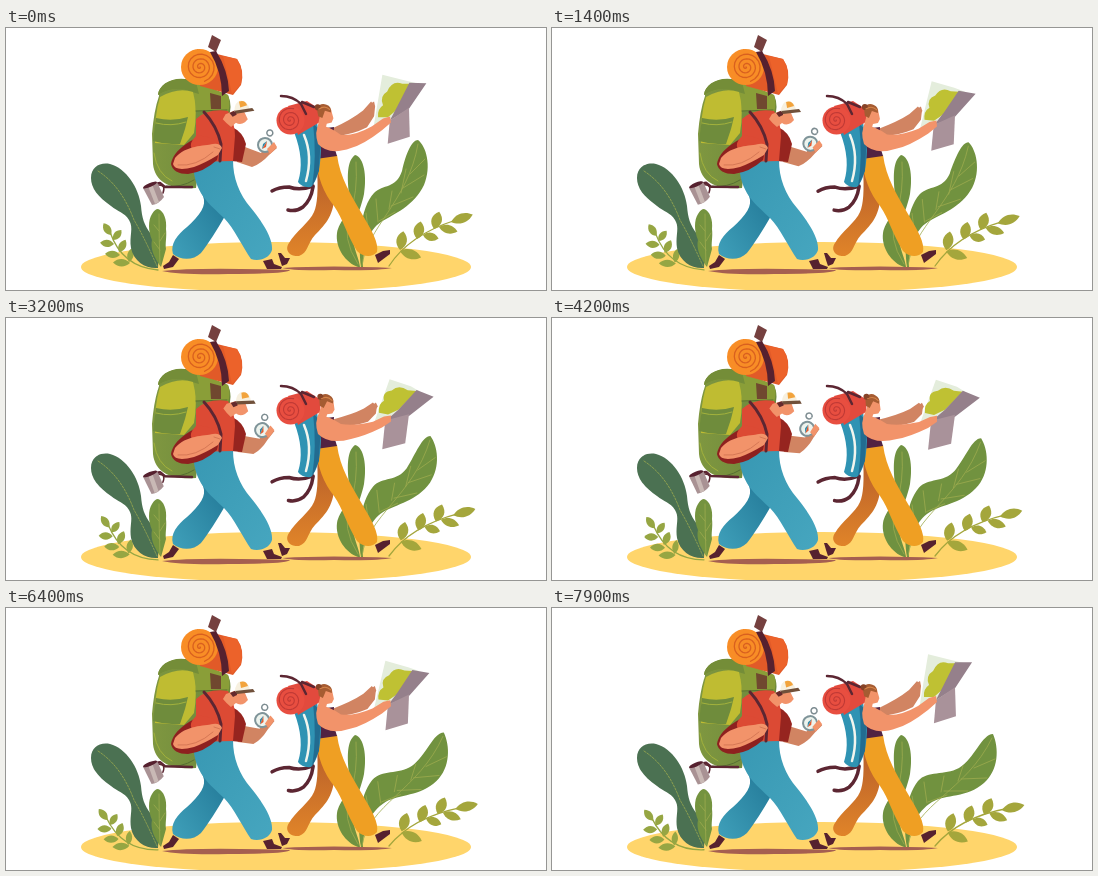
An HTML page for the animation above (8000 ms loop, 540 by 262 pixels).

```html
<!DOCTYPE html>
<html lang="en">
<head>
<meta charset="utf-8">
<title>Hikers</title>
<style>
html, body { margin: 0; width: 100%; height: 100%; overflow: hidden; background: #fff; }
svg { display: block; width: 100vw; height: 100vh; }
.line { fill: none; stroke-linecap: round; stroke-linejoin: round; }
.dark { fill: #56212f; }
.strap { stroke: #5c2632; }
.vein { stroke: #9dab4e; stroke-width: .8; }
.skin { fill: #f2936a; }
.tan { fill: #d18462; }
</style>
</head>
<body>
<svg viewBox="0 0 540 262">
  <defs>
    <linearGradient id="teal" x1="0" y1="0" x2="1" y2="1">
      <stop offset="0" stop-color="#3898b3"/><stop offset="1" stop-color="#46a6bf"/>
    </linearGradient>
    <linearGradient id="deepTeal" x1="1" y1="0" x2="0" y2="1">
      <stop offset="0" stop-color="#207594"/><stop offset="1" stop-color="#3fa0ba"/>
    </linearGradient>
    <linearGradient id="pack" x1="0" x2="1">
      <stop offset="0" stop-color="#7f9740"/><stop offset="1" stop-color="#6b863b"/>
    </linearGradient>
    <linearGradient id="rust" x1="0" y1="0" x2="0" y2="1">
      <stop offset="0" stop-color="#b85f2a"/><stop offset="1" stop-color="#e08429"/>
    </linearGradient>
  </defs>

  <ellipse cx="270" cy="239" rx="195" ry="25" fill="#ffd56b"/>

  <!-- left plants -->
  <g id="sprigL"></g>
  <path fill="#4b7152" d="M85 150C85 139 94 134 104 136C120 140 133 160 135 178C136 190 138 197 145 206C152 214 153 228 152 240C140 241 128 234 125 220C123 208 128 200 123 192C118 184 112 184 105 178C92 169 85 160 85 150Z"/>
  <path class="line vein" stroke-dasharray="2 1.500" d="M92 143C112 156 122 176 128 192Q137 207 151 238"/>
  <path fill="#74933f" d="M152 181C158 183 161 192 160 201C161 209 159 215 160 221L155 239C148 230 144 220 146 212C142 203 142 192 146 186Q149 181 152 181Z"/>
  <path class="line vein" d="M153 186Q153 210 154 237M153 203L148 197M154 213L159 205M154 222L148 214"/>

  <!-- right plants -->
  <path fill="#6f9140" d="M352 239C340 235 329 220 331 205C333 193 345 185 343 166C341 148 341 133 349 127C358 129 361 148 358 166C354 186 345 196 347 212C349 224 353 231 354 239Z"/>
  <path class="line vein" d="M350 134Q352 165 344 186Q335 210 352 236"/>
  <path id="leaf" fill="#71923f"/>
  <path id="veins" class="line vein"/>
  <g id="sprigR"></g>

  <!-- man -->
  <path fill="#a55f50" d="M156 243Q190 239 284 242Q282 246 222 246Q174 247 156 243Z"/>
  <path fill="url(#pack)" d="M153 68C153 56 172 47 190 54L222 67Q227 78 222 92L196 112L190 160C168 162 149 156 147 136L146 106Q148 82 153 68Z"/>
  <path fill="#8a9e38" d="M152 67C153 55 172 46 190 54L222 67Q225 75 222 84L190 83L186 64Q168 57 152 67Z"/>
  <path fill="#748d38" d="M152 67C153 54 172 46 190 54L193 66L186 64Q168 57 152 67Z"/>
  <path fill="#bfbc32" d="M154 69Q172 59 187 64Q192 82 188 105L178 117L149 115Q148 88 154 69Z"/>
  <path fill="#6f8c3c" d="M150 90Q166 94 182 89L179 101L174 116Q160 117 147 113Z"/>
  <path class="line" stroke="#a3b23c" d="M150 95Q165 99 180 94M148 125Q151 146 166 153"/>
  <path class="line" stroke="#566f32" d="M160 158Q175 160 188 152M190 83L221 82"/>

  <g id="mug">
    <path class="line strap" stroke-width="2.500" d="M186 159L159 159L154 155L149 156"/>
    <path fill="#a99294" d="M137 160L151 154L158 169Q153 176 146 177Z"/>
    <path fill="#c9b9b5" d="M142 158L146 156L153 174L149 176Z"/>
    <ellipse cx="144" cy="157" rx="7.500" ry="2" transform="rotate(-23 144 157)" class="dark"/>
    <path class="line strap" stroke-width="1.500" d="M153 157Q160 157 157 165"/>
  </g>

  <path fill="#e15a28" d="M191 21L231 31Q239 42 235 57L227 67L194 58Z"/>
  <path fill="#ec622a" d="M217 28L231 31Q238 42 235 56L226 66Z"/>
  <ellipse cx="193.500" cy="39" rx="18.500" ry="18" fill="#f88d26"/>
  <path id="coilM" class="line" stroke="#d9601f" stroke-width="1.300"/>
  <path fill="#75403f" d="M206 7L215 12L210 24L202 19Z"/>
  <path class="dark" d="M204 24L210 23Q222 42 223 63L216 68Q216 44 204 24Z"/>
  <path fill="#70482f" d="M204 65L215 68L215 81L205 81Z"/>

  <path class="dark" d="M167 227L173 231L167 239L158 241L157 238L163 234Z"/>
  <path class="dark" d="M257 233L266 231L268 236L276 239L275 241L261 241Z"/>
  <path fill="url(#deepTeal)" d="M189 150L219 188C211 202 202 216 195 225C187 233 174 232 167 226C164 216 171 207 181 199C194 187 201 178 197 168Z"/>
  <path fill="url(#teal)" d="M187 132L227 132C227 150 233 166 245 180C258 196 267 211 266 222C264 230 253 234 245 231C237 220 228 200 218 190C204 176 187 166 187 132Z"/>

  <g id="armM">
    <path class="tan" d="M233 113L239 119L255 125L262 114L264 118L268 117L271 120L263 127Q255 136 246 139L231 134Z"/>
    <path fill="none" stroke="#7d8c91" stroke-width="1.500" d="M266 107a3 3 0 1 0-.1 .1"/>
    <circle cx="259" cy="117" r="7" fill="#edf3ed" stroke="#7f9499" stroke-width="2"/>
    <path fill="#e25c32" d="M256 121L261 113L260 119Z"/>
    <path fill="#2f89a8" d="M261 113L257 116L256 121Z"/>
    <path class="skin" d="M261 121L268 114L271 119L264 126Z"/>
  </g>
  <path fill="#96241f" d="M226 99Q237 104 240 116L236 134L225 133Z"/>
  <path fill="#dc4a34" d="M190 91Q202 80 222 83Q229 95 229 108L227 133L187 134L190 116Z"/>
  <g id="headM">
    <path class="skin" d="M220 86L231 82L239 85L242 92L239 95Q234 98 230 95L225 99Q220 95 217 91Z"/>
    <path fill="#642a2d" d="M224 85L231 82L231 87L227 89Z"/>
    <path fill="#f7f0df" d="M229 84Q229 74 236 73Q243 74 244 82Z"/>
    <path fill="#f2a33c" d="M234 74Q240 72 242 78L235 80Z"/>
    <path fill="#70503a" d="M229 83L247 81L249 84L231 86Z"/>
  </g>
  <path class="line strap" stroke-width="3" d="M198 84Q211 98 215 116L214 133"/>
  <path fill="#8e211f" d="M190 110Q205 108 214 119L211 132Q198 144 182 146Q167 146 165 136Q167 122 190 110Z"/>
  <path fill="#dc4a34" d="M190 108Q206 106 214 119L186 121Q182 116 190 108Z"/>
  <path class="skin" d="M169 130C180 117 198 118 207 116Q214 115 216 120L212 127Q199 135 188 139Q169 144 167 136Z"/>
  <path class="line" stroke="#ce7050" stroke-width=".8" d="M172 137Q190 139 207 124M208 119L214 121"/>

  <!-- woman -->
  <path fill="#a55f50" d="M276 240Q325 237 386 240Q371 243 328 242Q287 243 276 240Z"/>
  <path id="armFar" class="tan"/>
  <path class="dark" d="M272 225L275 225L279 230L284 230L281 236L276 238L274 232Z"/>
  <path class="dark" d="M369 227L377 223L384 222L384 226L372 235Z"/>
  <path fill="url(#rust)" d="M311 140L328 165C329 186 320 196 309 207C301 216 302 225 293 228C284 229 278 222 283 215C289 204 304 194 308 184Q313 173 311 140Z"/>
  <path fill="#ef9f23" d="M310 130L331 127C334 150 345 167 356 186C366 203 373 215 371 224C366 230 357 229 351 223C341 207 337 191 328 178Q312 158 310 130Z"/>
  <path fill="#512342" d="M312 101L328 99L327 115L331 128L310 131Z"/>

  <g id="ribbons" class="line strap" stroke-width="3.500">
    <path d="M307 158Q294 163 283 159Q273 159 266 163"/>
    <path d="M307 159Q305 172 297 179Q290 184 282 182"/>
  </g>
  <path fill="#2f93b3" d="M288 104L311 94L315 122Q314 150 305 159Q296 160 292 154Q299 132 288 104Z"/>
  <path fill="#226c90" d="M307 95L315 104L313 143L306 159Q311 128 307 95Z"/>
  <path class="line" stroke="#f2f5ee" stroke-width="2.500" d="M298 107Q307 128 300 153"/>
  <path fill="#e24a3d" d="M282 78L301 73L315 82L314 94L292 107Z"/>
  <circle cx="284.500" cy="92.500" r="14" fill="#e84e40"/>
  <path id="coilW" class="line" stroke="#c03a35" stroke-width="1.100"/>
  <path class="line strap" stroke-width="2.500" d="M275 68Q287 68 295 76L300 86M296 74L308 79"/>

  <g id="headW">
    <path class="skin" d="M316 83L326 81L328 91L326 95L321 96L319 103L311 101Z"/>
    <path fill="#a65c32" d="M312 80Q316 74 322 77Q327 79 326 85L320 83L317 90L313 88Z"/>
    <circle cx="313" cy="79" r="3" fill="#864327"/>
    <path class="line" stroke="#d5854a" d="M314 81Q320 77 325 82"/>
  </g>
  <path id="pale" fill="#e4eddc"/>
  <path id="land" fill="#bfc133"/>
  <path id="mauve" fill="#95808b"/>
  <path id="flap" fill="#a9929a"/>
  <path id="armNear" class="skin"/>
  <path id="hand" class="tan"/>
</svg>

<script>
const $ = id => document.getElementById(id);

// Blend two paths that share the same commands.
const mix = (a, b, k) => {
  const ends = b.match(/-?[\d.]+/g);
  let i = 0;
  return a.replace(/-?[\d.]+/g, n => (+n + (ends[i++] - n) * k).toFixed(2));
};

const morphs = {
  leaf: ['sway',
    'M355 239C352 215 354 180 368 165C377 156 390 161 396 143C400 125 406 112 412 112C420 118 426 138 418 157C408 178 388 186 375 194C362 202 357 222 357 239Z',
    'M355 239C351 218 353 190 366 173C376 162 392 168 407 160C423 150 430 126 441 126C447 140 447 162 432 175C415 190 394 186 380 194C364 204 357 222 357 239Z'],
  veins: ['sway',
    'M356 238C360 200 402 174 412 116M363 209L360 185M372 194L370 171M383 181L386 163M395 165L400 141M373 193L389 184M385 178L407 169M397 160L418 147M404 146L419 131',
    'M356 238C362 196 414 184 440 130M364 209L360 188M375 195L372 174M389 184L392 168M406 173L411 158M376 194L395 187M392 183L416 183M409 171L435 170M422 160L443 151'],
  pale: ['map',
    'M376 46L400 52L413 55L403 79L384 95L366 108Z',
    'M384 62L405 69L413 74L402 98L379 103L366 111Z'],
  land: ['map',
    'M372 89Q371 81 377 77Q373 68 381 63Q386 51 396 55L404 55L391 81L382 89Z',
    'M373 95Q372 86 378 83Q376 74 386 73Q393 67 402 73L411 74L393 92L382 97Z'],
  mauve: ['map',
    'M403 54L420 54L403 80L384 92L391 78Z',
    'M411 73L428 80L403 99L380 103L393 92Z'],
  flap: ['map',
    'M384 92L403 79L404 108L382 115Z',
    'M379 103L403 97L399 126L376 132Z'],
  armFar: ['map',
    'M325 101Q346 91 357 82L365 73L369 78L368 88L361 99Q346 107 328 108Z',
    'M325 102Q346 97 358 91L367 85L371 89L370 96L362 104Q346 109 328 109Z'],
  armNear: ['map',
    'M313 97Q323 98 335 107Q349 108 366 98L377 90L384 88L385 94L376 102Q357 117 345 120Q323 128 312 116Q308 103 313 97Z',
    'M313 97Q323 98 335 106Q349 108 367 104L378 99L385 98L385 104L376 110Q357 119 345 121Q323 127 312 116Q308 103 313 97Z'],
  hand: ['map', 'M363 76L368 73L369 78L365 83Z', 'M366 88L370 85L372 89L368 94Z']
};

function coil(id, x, y, r, turns) {
  const pts = [];
  for (let i = 0; i <= 60; i++) {
    const a = i / 60 * turns * 2 * Math.PI, d = r * i / 60;
    pts.push((x + d * Math.cos(a)).toFixed(1) + ' ' + (y + d * Math.sin(a)).toFixed(1));
  }
  $(id).setAttribute('d', 'M' + pts.join('L'));
}

// Leaves: base x, base y, direction, length, half width.
function sprig(id, color, stem, leaves) {
  $(id).innerHTML = `<path class="line" stroke="${color}" stroke-width="1.300" d="${stem}"/>` +
    leaves.map(([x, y, a, n, w]) =>
      `<path fill="${color}" transform="translate(${x} ${y}) rotate(${a})" d="M0 0C${n * .3} ${-w * 1.4} ${n * .7} ${-w * 1.4} ${n} 0C${n * .7} ${w * 1.4} ${n * .3} ${w * 1.4} 0 0Z"/>`).join('');
}

coil('coilM', 194, 39, 15, 3.2);
coil('coilW', 284, 92, 12, 2.8);
sprig('sprigL', '#96a643', 'M152 242Q116 239 104 204', [
  [105, 207, -122, 14, 3.5], [108, 216, -175, 14, 3.5], [107, 212, -50, 13, 3.3],
  [114, 227, -175, 15, 3.5], [113, 224, -62, 14, 3.5], [124, 235, -178, 17, 3.5], [123, 234, -78, 14, 3]
]);
sprig('sprigR', '#a4a63c', 'M383 238Q403 207 450 192', [
  [445, 194, -19, 23, 4.5], [428, 201, -73, 18, 5], [433, 199, 14, 19, 4],
  [411, 211, -78, 18, 5], [417, 207, 13, 16, 4], [394, 222, -80, 19, 5], [394, 223, 17, 22, 4.5]
]);

const turn = (id, angle, x, y) => $(id).setAttribute('transform', `rotate(${angle} ${x} ${y})`);
const wave = (t, peak) => Math.cos(2 * Math.PI * (t - peak) / 9600);

function draw(t) {
  const sway = (Math.sin(.000297 * (t - 3450)) + .855) / 1.825;
  const map = (wave(t, 3850) + .9) / 1.9;
  const lift = (wave(t, 4800) + 1) / 2;
  const amount = { sway, map };
  for (const id in morphs) {
    const [kind, from, to] = morphs[id];
    $(id).setAttribute('d', mix(from, to, amount[kind]));
  }
  turn('sprigR', 7 * sway, 383, 238);
  turn('sprigL', -7 * sway, 150, 242);
  turn('armM', -14 * lift, 231, 130);
  turn('headM', -3 + 7 * map, 224, 96);
  turn('headW', -4 + 8 * map, 317, 100);
  turn('mug', 2 * lift, 186, 159);
  turn('ribbons', -1.5 * lift, 307, 159);
}

const start = performance.now();
function tick() {
  const t = (performance.now() - start) % 8000;
  draw(Math.floor(t / 100) * 100);
  requestAnimationFrame(tick);
}
tick();
</script>
</body>
</html>
```
